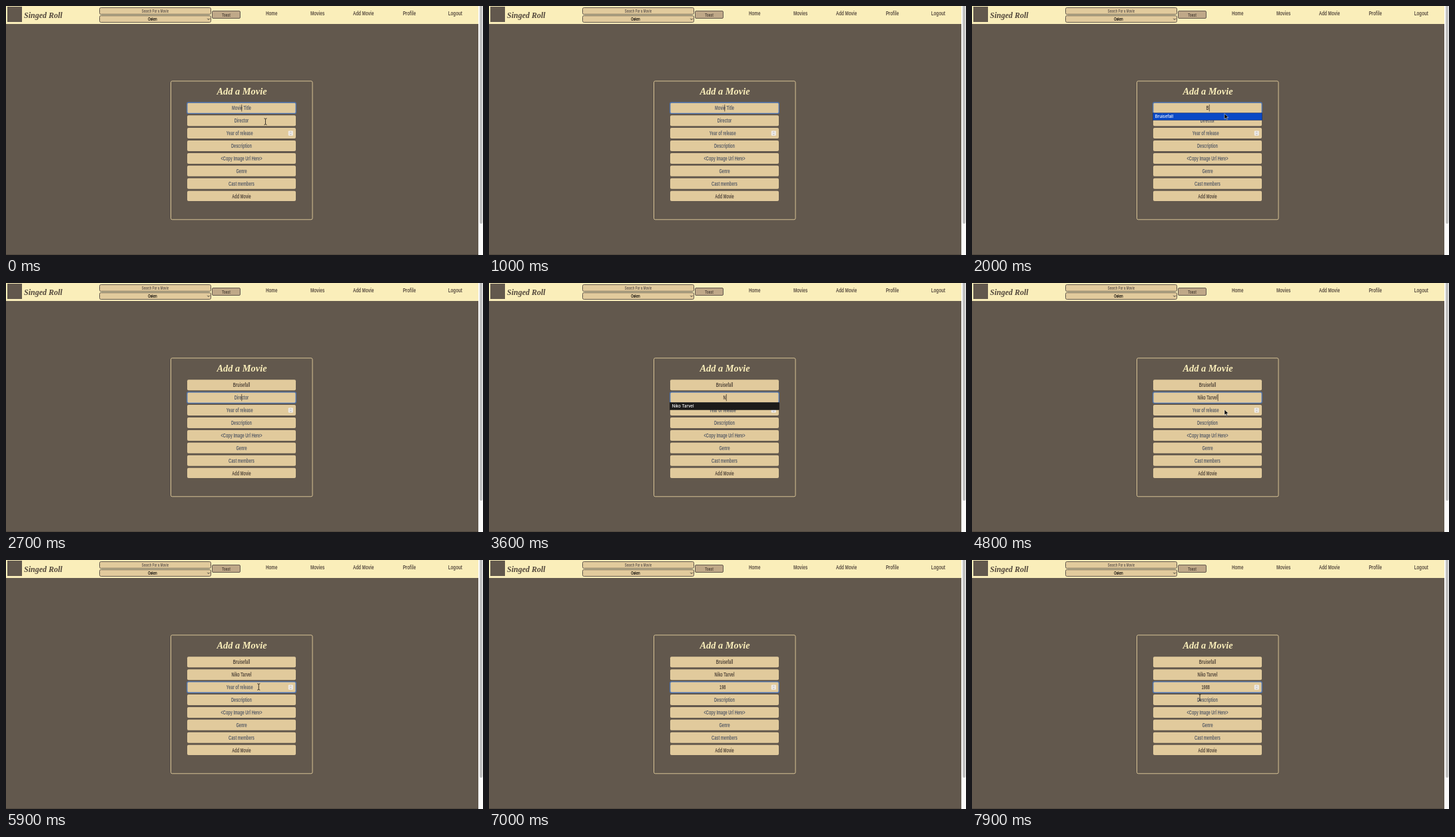
An HTML page for the animation above (8 s loop, 716 by 374 pixels).

```html
<!DOCTYPE html>
<html lang="en">
<head>
<meta charset="utf-8">
<title>Add a Movie</title>
<style>
  html, body { margin: 0; width: 100%; height: 100%; overflow: hidden; background: #62584d; }
  svg { display: block; width: 100%; height: 100%; }
  .label { font-family: "Liberation Sans", Arial, sans-serif; font-weight: bold; text-anchor: middle; }
  .script { font-family: "Liberation Serif", "Noto Serif", serif; font-weight: bold; font-style: italic; }
  .option { font: 500 6.1px Inter, Roboto, sans-serif; fill: #fff; }
</style>
</head>
<body>
<svg id="stage" viewBox="0 0 716 374" preserveAspectRatio="none">
  <rect width="716" height="374" fill="#62584d"/>
  <rect y="373" width="709" height="1" fill="#50473e"/>
  <rect width="709" height="27" fill="#faeeba"/>
  <rect x="709" width="7" height="374" fill="#fafafa"/>
  <rect x="711" y="-3" width="4.2" height="330" rx="2" fill="#c1c1c1"/>

  <rect x="2" y="1" width="22" height="23" fill="#62584d"/>
  <text class="script" x="27" y="17.5" font-size="12" fill="#51463b">Singed Roll</text>
  <g fill="#e1ca9c" stroke="#62584d">
    <rect x="140.5" y="2.5" width="167" height="10" rx="2"/>
    <rect x="140.5" y="14.5" width="167" height="10" rx="2"/>
    <rect x="309.5" y="7.5" width="42" height="11" rx="1.5" fill="#bfa888"/>
  </g>
  <path d="M302.3 18.8l1.7 1.7 1.7-1.7" fill="none" stroke="#222" stroke-width=".9"/>

  <rect x="247.5" y="112.8" width="212.5" height="208" rx="2" fill="none" stroke="#d8c395"/>
  <text class="script" x="354" y="133" font-size="14.4" text-anchor="middle" fill="#faeeba">Add a Movie</text>

  <g id="form"></g>
  <g id="spinner">
    <rect x="423.8" y="187.5" width="7" height="7.2" rx="1" fill="#efece8"/>
    <path d="M426 190.3l1.3-1.4 1.3 1.4M426 192l1.3 1.4 1.3-1.4" fill="none" stroke="#8b8b8b" stroke-width=".6"/>
  </g>
  <rect id="focus" x="271.8" width="163.4" height="16.4" rx="2" fill="none" stroke="#4c74b4" stroke-width="1.3"/>
  <rect id="caret" width=".8" height="10.4" fill="#3f352c"/>
  <g id="menu">
    <rect id="menuBox" x="271.5" width="164" height="10.6" stroke-width=".6"/>
    <text id="menuText" class="option" x="274.8" y="7.5"></text>
  </g>
  <path id="arrow" d="M0 0V8L1.9 6.3 3.2 9.2 4.5 8.6 3.2 5.8H5.8Z" fill="#000" stroke="#fff" stroke-width=".5"/>
  <path id="beam" d="M-2-4.8Q0-4.8 0-3.3V3.3Q0 4.8-2 4.8M2-4.8Q0-4.8 0-3.3M0 3.3Q0 4.8 2 4.8" fill="none" stroke="#29241f" stroke-width=".9"/>
</svg>
<script>
const LOOP = 8000, STEP = 100;
const NARROW = 0.64;             // one condensed face for all interface labels
const HINT = "#5c6068", INK = "#54483c";
const TITLE = "Bruisefall", DIRECTOR = "Niko Tarvel";
const $ = id => document.getElementById(id);

function add(parent, tag, attrs, text = "") {
  const el = document.createElementNS("http://www.w3.org/2000/svg", tag);
  for (const name in attrs) el.setAttribute(name, attrs[name]);
  el.textContent = text;
  return parent.appendChild(el);
}

function label(text, x, y, size, fill) {
  return add($("form"), "text", {
    class: "label", "font-size": size, fill,
    transform: `translate(${x} ${y}) scale(${NARROW} 1)`
  }, text);
}

label("Search For a Movie", 224, 10, 6.9, "#6a5f55");
label("Oaken", 220, 22, 6.9, "#15110d");
label("Toast", 330.5, 15.8, 7.6, INK);
["Home", "Movies", "Add Movie", "Profile", "Logout"]
  .forEach((name, i) => label(name, 398.7 + 68.9 * i, 14.2, 9.8, "#5d5144"));

const rowTop = i => 145.2 + 18.93 * i;
const rowCenter = i => i === 2 ? 350.7 : 353.5;
const hints = ["Movie Title", "Director", "Year of release", "Description",
  "<Copy Image Url Here>", "Genre", "Cast members", "Add Movie"];
const fields = hints.map((hint, i) => {
  const isButton = i === 7;
  add($("form"), "rect", {
    x: 272, y: rowTop(i), width: 163, height: isButton ? 15.4 : 16, rx: 2, fill: "#e1ca9c"
  });
  return label(hint, rowCenter(i), rowTop(i) + (isButton ? 10.8 : 11.1), 8.8, isButton ? INK : HINT);
});

// Each track is a list of [time, value]; a value holds until the next entry.
const tracks = {
  values: [
    [[0, ""], [1100, "B"], [2400, TITLE]],
    [[0, ""], [3400, "N"], [4700, DIRECTOR]],
    [[0, ""], [6200, "1"], [6300, "19"], [6400, "198"], [7100, "1988"]]
  ],
  focus: [[0, 0], [2700, 1], [5300, 2]],
  caret: [[0, 1], [500, 0], [1000, 1], [1500, 0], [2000, 1], [3200, 0], [3400, 1],
    [4000, 0], [4500, 1], [5900, 0], [6200, 1], [7000, 0], [7100, 1], [7600, 0]],
  menu: [[0, ""], [1100, "open"], [1800, "hover"], [2400, ""],
    [3500, "open"], [4400, "hover"], [4700, ""]]
};

// shape, start, end of glide, from x, y, to x, y
const pointer = [
  { at: 0, shape: "beam", from: [389.5, 173.6] },
  { at: 100, shape: "beam", from: [379.5, 161] },
  { at: 500 },
  { at: 1700, shape: "arrow", from: [379, 160.5], to: [379, 161.7], until: 2000 },
  { at: 2100, shape: "arrow", from: [379, 167] },
  { at: 2500 },
  { at: 3800, shape: "beam", from: [379.3, 166], to: [379.3, 174.5], until: 4100 },
  { at: 4300, shape: "arrow", from: [379, 177], to: [379, 182.3], until: 4500 },
  { at: 4700, shape: "arrow", from: [379, 187], to: [379, 190.3], until: 4800 },
  { at: 5100, shape: "beam", from: [379.3, 190.5] },
  { at: 6200 },
  { at: 7600, shape: "beam", from: [331, 191], to: [342, 206.4], until: 7900 }
];

const hold = (track, t) => track.findLast(([at]) => at <= t)[1];
const show = (id, on) => $(id).setAttribute("visibility", on ? "visible" : "hidden");

function drawPointer(t) {
  const { at, shape, from, to = from, until = at + 1 } = pointer.findLast(p => p.at <= t);
  show("arrow", shape === "arrow");
  show("beam", shape === "beam");
  if (!shape) return;
  const k = Math.min(1, (t - at) / (until - at));
  const [x, y] = from.map((v, i) => v + (to[i] - v) * k);
  $(shape).setAttribute("transform", `translate(${x} ${y})`);
}

function drawMenu(state, row) {
  show("menu", state);
  const hover = state === "hover";
  $("menu").setAttribute("transform", `translate(0 ${rowTop(row) + 15.6})`);
  $("menuBox").setAttribute("fill", hover ? "#0a49c6" : "#1c1b1a");
  $("menuBox").setAttribute("stroke", hover ? "#182b62" : "#111");
  $("menuText").textContent = row === 0 ? TITLE : DIRECTOR;
}

function render(time) {
  const t = Math.floor((time % LOOP) / STEP) * STEP;
  const row = hold(tracks.focus, t);
  const values = tracks.values.map(track => hold(track, t));
  values.forEach((value, i) => {
    fields[i].textContent = value || hints[i];
    fields[i].setAttribute("fill", value ? INK : HINT);
  });

  $("focus").setAttribute("y", rowTop(row) - 0.2);
  const half = values[row] ? fields[row].getComputedTextLength() * NARROW / 2 + 0.4 : 0;
  $("caret").setAttribute("x", rowCenter(row) + half - 0.1);
  $("caret").setAttribute("y", rowTop(row) + 2.8);
  show("caret", hold(tracks.caret, t));
  drawMenu(hold(tracks.menu, t), row);
  drawPointer(t);
}

const start = performance.now();
function tick() {
  render(performance.now() - start);
  requestAnimationFrame(tick);
}
tick();
</script>
</body>
</html>
```
